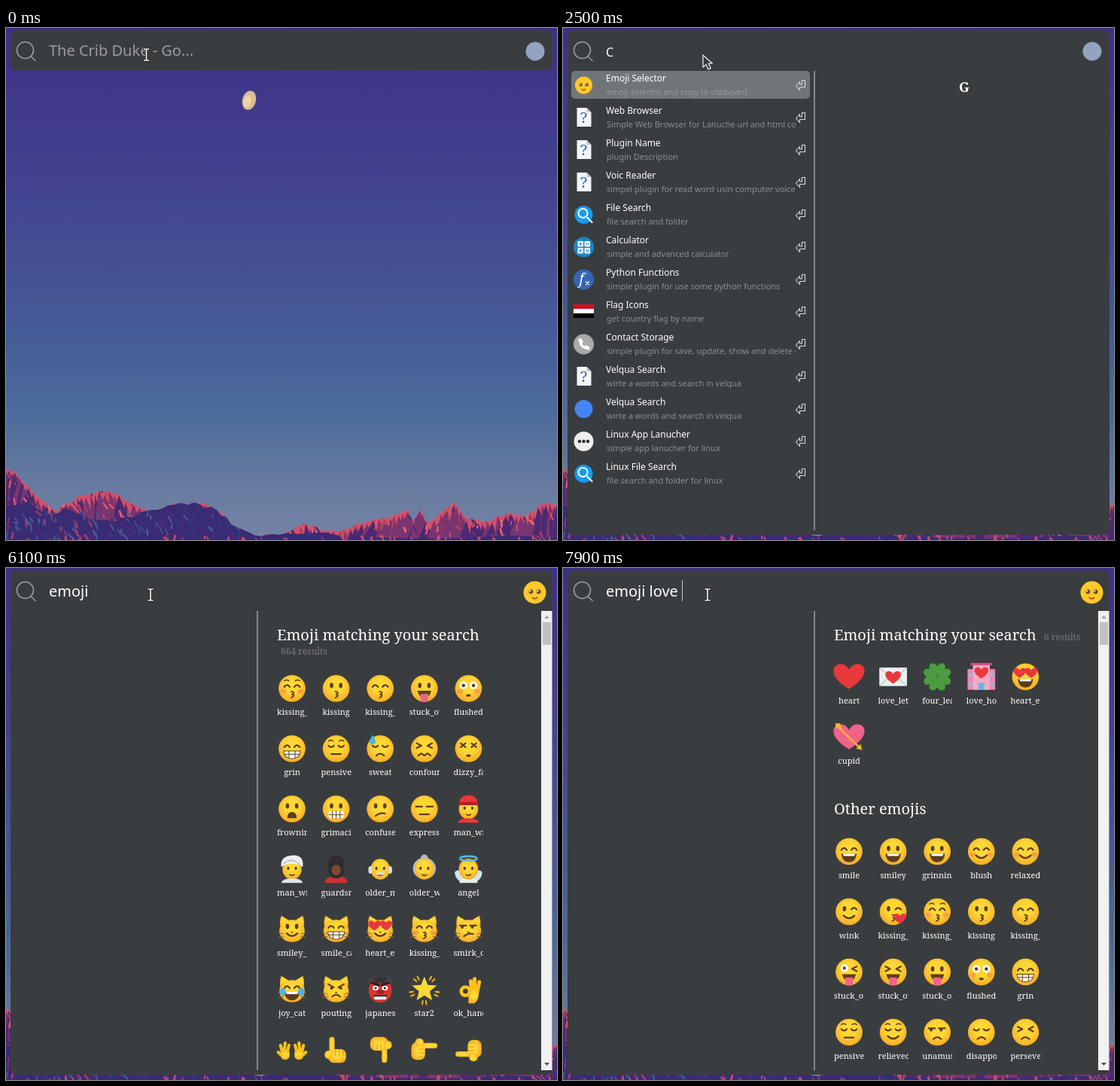
Write an HTML page that moves like this. It is 732 by 680 pixels and loops after 8 s.

```html
<!DOCTYPE html>
<html lang="en">
<head>
<meta charset="utf-8">
<title>Launcher</title>
<style>
html, body { margin: 0; width: 732px; height: 680px; overflow: hidden; background: #3f3289 }
svg { display: block }
text { font-family: "Noto Sans", sans-serif; white-space: pre }
.serif, .label { font-family: "Noto Serif", serif }
.mid { text-anchor: middle }
.bold { font-weight: 700 }
.label { font-size: 11px; line-height: 16px; width: 40px; overflow: hidden; text-align: center; white-space: nowrap; color: #fff }
</style>
</head>
<body>
<script>
const B = '#5f3d1c', Y = 'url(#skin)', RED = '#e8383d', PINK = '#f0628c';

// Drawing helpers; small pictures are centred on 0,0 and about 36 wide.
const L = (d, c = B, w = 2.2) => `<path d="M${d}" fill="none" stroke="${c}" stroke-width="${w}" stroke-linecap="round" stroke-linejoin="round"/>`;
const F = (d, c) => `<path d="M${d}z" fill="${c}"/>`;
const O = (x, y, r, c, q = r) => `<ellipse cx="${x}" cy="${y}" rx="${r}" ry="${q}" fill="${c}"/>`;
const R = (x, y, w, h, c, r = 0) => `<rect x="${x}" y="${y}" width="${w}" height="${h}" rx="${r}" fill="${c}"/>`;
const T = (x, y, size, s, c = '#fff', cls = '') => `<text x="${x}" y="${y}" font-size="${size}" fill="${c}" class="${cls}">${s}</text>`;
const at = (x, y, k, s, a = 0) => `<g transform="translate(${x} ${y}) rotate(${a}) scale(${k})">${s}</g>`;
const two = s => s + `<g transform="scale(-1 1)">${s}</g>`;
const many = (n, f) => Array.from({ length: n }, (_, i) => f(i)).join('');
const turn = (n, s) => many(n, i => at(0, 0, 1, s, i * 360 / n));
const group = (id, s) => `<g id="${id}">${s}</g>`;
const heart = c => F('0 16C-40-8-10-28 0-9 10-28 40-8 0 16', c);
const star = (n, a, b, c) => F(Array.from({ length: 2 * n }, (_, i) => {
  const r = i % 2 ? a : b, q = i * Math.PI / n;
  return (r * Math.sin(q)).toFixed(1) + ' ' + (-r * Math.cos(q)).toFixed(1);
}).join('L'), c);
const person = (x, hair, shirt, y = 0) => at(x, y, 1,
  R(-6, -5, 12, 15, shirt, 4) + R(-4, 8, 8, 10, '#37474f') + O(0, -12, 5.5, hair) + O(0, -10, 4, Y));
const point = a => at(0, 0, 1, R(-9, -17, 7, 26, Y, 3.5) + R(-10, -1, 23, 18, Y, 7) + R(-15, 1, 10, 11, Y, 5) +
  L('-1 0v7m5-7v7m5-6v6', '#e09a20', 1), a);
const phone = c => L('-9-10Q-10 8 10 10', c, 6) + L('-9-11l2 5M6 8l5 2', c, 10);

const part = {
  face: O(0, 0, 17.5, Y),
  cat: two(F('3-11l11-7q3 8 1 16', Y)) + O(0, 2, 16.5, Y, 14.5) + two(L('11 6l7-2m-7 5l7 1', '#8a6a3a', 1)) + F('-2 3h4l-2 2', B),
  imp: two(F('5-11q8-1 9-7 4 7 0 13', '#8e3fa8')) + O(0, 1, 16, '#9c4fc0'),
  man: O(0, 0, 12.5, Y, 13.5) + two(O(5, -1, 1.6, B, 2.1)) + L('-3 7q3 2.5 6 0', B, 1.5),
  // eyes
  dot: two(O(6, -4, 2.3, B, 3.4)), arc: two(L('3-2q3.5-5 7 0')), shut: two(L('3-4q3.5 4 7 0')),
  flat: two(L('3-3h8')), cross: two(L('4-7l6 5m0-5l-6 5')), squint: two(L('10-7l-6 3 6 3')),
  big: two(O(6.5, -4, 5, '#fff') + O(6.5, -4, 2.2, B)), love: two(at(7.5, -5, .4, heart(RED))),
  wink: O(-6, -4, 2.3, B, 3.4) + L('3-3q3.5-4 7 0'), goofy: O(-6, -5, 5, '#fff') + O(-6, -5, 2, B) + L('10-7l-6 3 6 3'),
  side: L('-11-5h8m5 0h8') + O(-8, -3, 2, B) + O(5, -3, 2, B),
  shades: two(F('1-7h15q0 10-7 10t-8-10', '#292b2e')) + L('-15-7h30', '#292b2e'),
  angry: two(L('3-3l7-4')) + two(O(6, -2, 2, B)),
  // mouths
  kiss: L('-1 4q6 1 1 4 5 1-1 4', B, 1.8), smile: L('-7 5q7 7 14 0'), frown: L('-5 9q5-5 10 0'),
  wave: L('-8 9l4-3 4 3 4-3 4 3'), gape: F('-6 12q0-8 6-8t6 8', B), line: L('-6 7h12'), skew: L('-6 9q6-5 12-3'), small: O(0, 9, 3, B, 1.6),
  open: F('-10 3h20q-1 11-10 11t-10-11', B) + F('-8 3h16l-1 3h-14', '#fff'),
  teeth: F('-11 3h22q-1 10-11 10t-11-10', '#fff') + L('-11 3h22q-1 10-11 10t-11-10zm1 4h20M-4 3v9M4 3v9', B, 1),
  clench: R(-10, 3, 20, 9, '#fff', 3) + L('-9 7.5h18M-5 3v9M0 3v9M5 3v9', B, 1),
  tongue: F('-9 3h18q-2 9-9 9t-9-9', B) + F('-5 7h10v6q0 5-5 5t-5-5', PINK),
  // extras
  blush: two(O(11, 4, 4, '#f58b4c99', 3)), brow: two(L('4-10q3-2 6 0', B, 1.4)),
  kissheart: at(9, 9, .4, heart(RED)), drop: F('-10-18q-5 8-4 10 4 5 8 0 1-2-4-10', '#4fb3e8'),
  tears: two(O(12, 3, 4, '#4fb3e8', 5)),
  guapi: F('-12-7q1-11 12-11t12 11', RED) + R(-13, -9, 26, 4, '#b71c1c', 2) + F('-14 18q2-6 14-6t14 6', RED),
  turban: F('-14-3q-2-14 14-15t14 15q-14-8-28 0', '#eceff1') + L('-11-7Q0-17 11-5', '#b0bec5', 1.3) + F('-14 18q1-6 14-6t14 6', '#e3e6e8'),
  guard: F('-15 18q1-9 15-9t15 9', '#d32f2f') + R(-10, -18, 20, 30, '#302c2d', 9) + O(0, 1, 6, '#7a4a35', 7),
  oldman: two(O(13, 1, 2.5, '#ddd', 5)) + F('-7 6q7-4 14 0-7 3-14 0', '#ddd'),
  oldhair: O(0, -14, 5, '#b6b8ba') + O(0, -1, 15, '#b6b8ba', 14),
  halo: two(F('5 6q9-8 13-2-1 10-9 13', '#cfe5ee')) + F('-12 18q1-8 12-8t12 8', '#e6eef2') + O(0, -4, 13, '#6d4330'),
  ring: `<ellipse cy="-14" rx="11" ry="3" fill="none" stroke="#55b9e8" stroke-width="2.5"/>`,
  ogre: two(F('5-11q7-2 7-7 6 7 1 12', '#444')) + O(0, 1, 15, '#d73530', 16) + O(0, -12, 9, '#3a3233', 4) + two(O(6, -2, 4, '#fff', 3) + O(6, -2, 1.5, '#222') + L('2-6l9-3', '#222', 3)) +
    O(0, 3, 5, '#a81f24', 3) + R(-8, 8, 16, 5, '#eee', 2) + L('-8 8h16', '#3a3233'),
  star2: turn(5, at(0, -13, 1, L('-7 0l-2-4M7 0l2-4', '#fcb316', 2))) + star(5, 7.5, 17, '#fdd835'),
  ok_hand: L('4 2L3-11M8 2V-14M11 5l3-15', '#fcc21b', 5) + F('0 0h13q2 12-5 18h-8', Y) + `<circle cx="-4" cy="2" r="5.5" fill="none" stroke="#fcc21b" stroke-width="4.5"/>`,
  open_hands: two(R(3, -1, 12, 14, Y, 6) + L('6 2L4-6M10 1l-1-10M13 2l2-8M15 6l3-3', '#fcc21b', 4)),
  point_up_2: point(0), point_down: point(180), point_right: point(90), point_left: point(-90),
  hair: O(0, -2, 15, '#593c2b', 15) + two(R(8, 0, 9, 16, '#593c2b', 4)),
  fringe: F('-12-2q1-12 12-12t12 12q-14 0-18-6-1 5-6 6', '#593c2b'),
  see_no_evil: two(O(15, 2, 4, '#c49a78')) + O(0, 0, 15, '#795645', 16) + O(0, 6, 11, '#d6ad89', 9) + two(O(6, -3, 7, '#927059', 6) + L('4-6v5m4-5v5', '#694b3b', 1)) + L('-4 10q4 3 8 0', B, 1.5),
  boom: star(12, 8, 18, '#e8432e') + star(12, 6, 13, '#fb9b26') + star(10, 4, 8, '#ffe46b'),
  clap: at(0, 2, 1, R(-8, -8, 17, 24, Y, 7) + L('-5-5v-7M0-6v-8M5-5v-7M9 4l4-7', '#fcc21b', 4.5) + L('-3-4v7M2-4v7', '#e39a20', 1), -25) + L('5-13l1-4m4 6l4-3m-2 7l4 0', '#b9d7e6', 1.6),
  muscle: F('-17 14q-2-22 5-30l8-1q4 4 1 7l-6 3q-1 6 2 8 8-8 18-3 10 8 4 16-14 8-32 0', Y),
  family: person(-9, '#4c3426', '#3f9b4a') + person(9, '#5b3b2a', '#8e44ad') + at(-6, 8, .7, person(0, '#4c3426', '#f0b429')) + at(7, 8, .7, person(0, '#593c2b', '#29a3d6')),
  two_men_holding_hands: person(-9, '#3a2a22', '#2878b5') + person(9, '#3a2a22', '#4a9b45') + L('-4 2L0 7l4-5', '#fcc21b'),
  two_women_holding_hands: person(-9, '#5b3b2a', '#8b4bb0') + person(9, '#5b3b2a', '#c2559f') + L('-4 2L0 7l4-5', '#fcc21b'),
  eyeglasses: two(R(2, -5, 15, 10, '#cfd8dc', 4) + R(4, -3, 11, 6, '#5f6b72', 3)) + L('-3-3h6', '#cfd8dc'),
  love_letter: R(-18, -12, 36, 24, '#eceff1', 1) + L('-17 11L-4 0M17 11L4 0M-17-11L0 3l17-14', '#b0bec5', 1) + at(0, 1, .5, heart(RED)),
  turtle: two(O(9, 11, 4, '#5e9c3a')) + O(12, -2, 6, '#74b04a') + O(14, -4, 1.3, '#222') + F('-18 10q2-20 15-20t14 20', '#4b7b33') + L('-13 4l7-8 8 0 5 8m-13-8l-1 9', '#9dc46a', 1.5),
  snail: F('-12 15q-3-4 4-5h10l7-15 6 0q5 2 2 6l-8 13', '#c99a72') + O(-3, 0, 12, '#8a5a3b') + L('-3 1q4-2 3 3-6 4-8-3 0-8 8-8 8 3 8 8', '#c99a72') + L('11-5l-1-6m5 6l2-6', '#c99a72', 1.5),
  cherry_blossom: turn(5, O(0, -11, 7, '#f8c8dc', 7.5)) + turn(5, L('0-4v-6', '#d8578f', 1.4)) + O(0, 0, 4, '#e57ba4'),
  tulip: L('0-2v19', '#4f9d3a', 2.6) + F('0 16q-10-4-10-14 9 4 10 14 1-10 10-14 0 10-10 14', '#4f9d3a') + F('-8-14l4 3 4-7 4 7 4-3q3 17-8 17t-8-17', '#e4447a'),
  four_leaf_clover: L('0 0q4 8 9 16', '#3f8a38') + turn(4, at(0, -9, .52, heart('#4c9b41'))),
  leaves: L('-2-4Q2-16 16-15M14-8Q18-2 12 6', '#8b9c90', 1.6) + F('-16-2Q-2-8 11 0 18 8 11 13-8 18-16-2', '#3f9149') + L('-12 0Q2 2 11 9', '#7dbd6b', 1.2),
  seedling: L('0 16Q1 6 0 2', '#5c9e3b', 3) + F('0 3Q-16 4-17-9-2-10 0 3', '#67ad45') + F('0 2Q0-14 17-15 17 0 0 2', '#67ad45') + O(0, 16, 10, '#6b4a34', 2),
  globe_with_meridians: O(0, 0, 17.5, '#2b8fd3') + L('-17 0h34M0-17v34M-14-9h28M-14 9h28M0-17q-18 17 0 34 18-17 0-34', '#8fc9ef', 1.3),
  partly_sunny: at(3, -5, 1, turn(10, L('0-9v-3', '#fbb124'))) + O(3, -5, 8, '#fdbf2d') + O(-8, 7, 8, '#e8eef2') + O(2, 4, 9, '#f3f6f8') + O(10, 9, 7, '#e8eef2') + R(-8, 7, 18, 9, '#e8eef2', 3),
  snowflake: turn(6, L('0 0v-16m-4 1l4 4 4-4m-8 7l4 4 4-4', '#a6dcf5', 2)),
  cyclone: turn(3, F('-3-9q6-9 19-6-8 1-8 9-1 9-7 10 4-8-4-13', '#1e86cf')) + O(0, 0, 12, '#1e86cf') + O(0, 0, 5, '#3a3d40'),
  jack_o_lantern: R(-3, -17, 6, 8, '#5a7d2e', 2) + O(0, 2, 17, '#e87a1c', 14) + L('-6-10q-6 12 0 24M6-10q6 12 0 24', '#c25d10', 1) + two(F('3 0l4-7 4 7', '#31261c')) + F('-11 4l6 3 5-2 5 2 6-3q-3 9-11 9t-11-9', '#31261c'),
  telephone_receiver: phone('#52575c'),
  satellite: F('-11-9Q-12 12 10 10', '#8a93c4') + F('-11-9Q8-8 10 10-8 8-11-9', '#b0b8dc') + L('0 0L13-14M-4 10l-4 7h14l-4-7', '#8a93c4', 2),
  no_bell: F('-11 9q4-3 4-11t7-9 7 9 4 11', '#f7b526') + O(0, 11, 4, '#d48a16', 3) + `<circle r="15.5" fill="none" stroke="#d92b2f" stroke-width="3.6"/>` + L('-11-11l22 22', '#d92b2f', 3.6),
  bulb: O(0, -6, 11, '#fdd85d') + F('-7 0h14l-2 9h-10', '#fdd85d') + R(-5, 8, 10, 8, '#9aa7ad', 3) + L('-3 7v-9l3 3 3-3v9', '#e0a02b', 1.2),
  pill: at(0, 0, 1, R(-18, -8, 36, 16, '#f9c430', 8) + F('0-8h-10q-8 0-8 8t8 8h10', '#e43c34') + L('-11-4h20', '#ffffff77', 2), 40),
  calling: R(0, -17, 17, 35, '#414a50', 3) + R(2, -13, 13, 26, '#7b98a6') + F('-18-3h8v-5l9 8-9 8v-5h-8', '#fba322'),
  email: R(-18, -12, 36, 25, '#fbc02d', 2) + L('-17 12L-5 0M17 12L5 0M-17-11L0 3l17-14', '#e08f1b', 1.2),
  date: R(-17, -17, 34, 34, '#f2f2f2', 2) + R(-17, -17, 34, 14, '#2b8fd3', 2) + T(0, -7, 9, 'July', '#fff', 'mid bold') + T(0, 13, 17, '17', '#333', 'mid bold'),
  clapper: R(-17, -4, 34, 21, '#37474f', 1) + at(-16, -5, 1, R(0, -8, 34, 7, '#37474f') + F('4-8h5l4 7h-5M15-8h5l4 7h-5M26-8h5l4 7h-5', '#eee'), -10) + R(-17, -4, 34, 6, '#eee') + L('-13-3l4 4M-2-3l4 4m7-4l4 4', '#37474f', 3) + L('-13 8h26m-26 5h26', '#90a4ae', 1),
  heart: heart(RED),
  love_hotel: R(-18, -10, 36, 27, '#ef86ae', 1) + R(-11, -17, 22, 34, '#f5a9c4', 1) + R(-14, -18, 28, 3, '#d64e84') + at(0, -5, .45, heart(RED)) + R(-4, 8, 8, 9, '#66b7df') + two(R(12, 7, 4, 5, '#7cc7e8') + R(12, -5, 4, 5, '#7cc7e8')),
  cupid: heart(PINK) + L('-14-13L14 14', '#f6b42b', 2.4) + F('-18-18h6l3 8-8-2M17 17l-8-2 6-6', '#f6b42b')
};

const look = {
  kissing_closed_eyes: 'face blush arc brow kiss', kissing: 'face dot kiss', kissing_smiling_eyes: 'face arc kiss',
  stuck_out_tongue: 'face dot tongue', flushed: 'face blush big small', grin: 'face arc teeth', pensive: 'face shut brow line',
  sweat: 'face shut frown drop', confounded: 'face squint wave', dizzy_face: 'face cross small', frowning: 'face dot gape',
  grimacing: 'face dot clench', confused: 'face dot skew', expressionless: 'face flat line', man_with_gua_pi_mao: 'man guapi',
  man_with_turban: 'man turban', guardsman: 'guard', older_man: 'man oldman', older_woman: 'oldhair man', angel: 'halo man ring',
  smiley_cat: 'cat dot smile', smile_cat: 'cat arc teeth', heart_eyes_cat: 'cat love smile', kissing_cat: 'cat blush arc kiss',
  smirk_cat: 'cat side skew', joy_cat: 'cat arc open tears', pouting_cat: 'cat angry frown', japanese_ogre: 'ogre',
  smile: 'face arc open', relaxed: 'face blush arc smile', sunglasses: 'face shades smile', smiling_imp: 'imp angry smile',
  girl: 'hair man fringe', heart_eyes: 'face open love', smiley: 'face dot open', grinning: 'face dot open', blush: 'face blush arc smile',
  wink: 'face wink smile', kissing_heart: 'face wink kiss kissheart', stuck_out_tongue_winking_eye: 'face goofy tongue',
  stuck_out_tongue_closed_eyes: 'face squint tongue', relieved: 'face shut brow smile', unamused: 'face side frown',
  disappointed: 'face shut frown', persevere: 'face squint frown'
};
const draw = name => (look[name] || name).split(' ').map(p => part[p]).join('');

const grid = (y0, names) => names.trim().split(/\s+/).map((name, i) => {
  const x = 380 + i % 5 * 58.6, y = y0 + Math.floor(i / 5) * 80;
  return at(x, y, 1.02, draw(name)) +
    `<foreignObject x="${x - 20}" y="${y + 23}" width="40" height="16"><div class="label">${name}</div></foreignObject>`;
}).join('');
const title = (y, s) => T(360, y, 20, s, '#fff', 'serif');
const count = (x, y, n) => T(x, y, 12, n + ' results', '#77797a', 'serif');

const smiley = r => at(0, 0, r / 63, O(0, 0, 63, '#ffc927') +
  two(O(21.5, -4, 12.5, '#6d4c41')) + O(-27, -8, 4.8, '#fff') + O(16, -8, 4.8, '#fff') + L('-13 29q13 13 26 0', '#8d4a1f', 7));
const glass = L('5 4l6 6', '#fff', 2.2) + `<circle cx="-1" cy="-2" r="6" fill="none" stroke="#fff" stroke-width="2"/>`;
const icons = {
  smiley: smiley(11.5),
  doc: F('-9-13h13l6 6v19h-19', '#f4f5f6') + F('4-13l6 6h-6', '#c4c8cb') + T(0, 7, 20, '?', '#2c64b0', 'serif mid'),
  find: O(0, 0, 12, '#159bf3') + glass,
  calc: O(0, 0, 13.5, '#1a87c4') + [[-8, -8], [1, -8], [-8, 1], [1, 1]].map(p => R(...p, 7.5, 7.5, '#fff', 1)).join('') +
    L('-6.5-4.2h4.5m-2.2-2.2v4.5M3-4.2h4M-6 3l3 4m0-4l-3 4M3 4h4m-4 2h4', '#1a87c4', 1),
  func: O(0, 0, 13.5, '#3566b4') + `<g font-style="italic">${T(-3, 6, 19, 'f', '#fff', 'serif mid')}</g>` + L('3 3l4 4m0-4l-4 4', '#fff', 1.2),
  flag: R(-13.5, -10, 27, 6, '#ce1126') + R(-13.5, -4, 27, 6, '#fff') + R(-13.5, 2, 27, 6, '#000'),
  call: O(0, 0, 13.5, '#a9a9ab') + at(0, 0, .5, phone('#fff')),
  disc: O(0, 0, 12, '#4285f4'),
  dots: O(0, 0, 13, '#efefef') + [-5.5, 0, 5.5].map(x => O(x, 0, 2.3, '#333')).join('')
};
const rows = [
  ['smiley', 'Emoji Selector', 'emoji selectro and copy to clipboard'],
  ['doc', 'Web Browser', 'Simple Web Browser for Lanuche url and html code'],
  ['doc', 'Plugin Name', 'plugin Description'],
  ['doc', 'Voic Reader', 'simpel plugin for read word usin computer voice'],
  ['find', 'File Search', 'file search and folder'],
  ['calc', 'Calculator', 'simple and advanced calculator'],
  ['func', 'Python Functions', 'simple plugin for use some python functions'],
  ['flag', 'Flag Icons', 'get country flag by name'],
  ['call', 'Contact Storage', 'simple plugin for save, update, show and delete contacts'],
  ['doc', 'Velqua Search', 'wirte a words and search in velqua'],
  ['disc', 'Velqua Search', 'wirte a words and search in velqua'],
  ['dots', 'Linux App Lanucher', 'simple app lanucher for linux'],
  ['find', 'Linux File Search', 'file search and folder for linux']
];
const list = R(11, 57, 317, 37, '#707677', 5) + rows.map(([icon, name, info], i) => at(0, 43 * i, 1,
  at(27.5, 76, 1, icons[icon]) + T(57, 71, 12, name) +
  `<svg x="58" y="76" width="251" height="18">${T(0, 13, 11, info, i ? '#8b8f90' : '#94999a')}</svg>` +
  L('317.5 69.5h4v9h-7v4l-5-5.5 5-5.5v3.5h3z', '#d8d9da', 1.1))).join('');

// Wallpaper: sky, moon and rough mountains with shaded facets
let seed = 7;
const rnd = () => (seed = seed * 16807 % 2147483647) / 2147483647;
const rough = s => {
  const pts = s.split(' ').map(p => p.split(',').map(Number));
  return pts.flatMap(([x, y], i) => {
    const [u, v] = pts[i + 1] || [x, y];
    return [0, .25, .5, .75].map(k => [x + (u - x) * k, y + (v - y) * k + (k && rnd() * 6 - 3)].map(Math.round));
  });
};
const close = pts => pts.join('L') + 'V680H0';
const ridge = rough('0,587 12,590 24,604 48,627 66,641 80,632 100,622 124,614 150,620 187,641 215,634 250,630 280,640 305,662 340,675 368,672 398,658 420,668 450,666 480,656 510,650 533,640 540,654 550,640 560,657 595,630 612,652 640,655 665,645 690,650 712,632 732,634');
const base = rough('0,634 30,628 60,650 80,641 110,652 150,654 187,641 215,634 250,630 280,640 305,662 340,674 400,671 500,677 732,677');
const facets = ridge.map(([x, y]) => F(`${x} ${y + 3 * rnd()}l${4 + 7 * rnd()} 20 ${6 * rnd() - 8} 40h-9l${8 * rnd() - 4}-38`, rnd() < .5 ? '#4b2a72' : '#7a3570')).join('');
const specks = (n, x0, y0, w, h, colors) => many(n, () =>
  L(`${x0 + w * rnd()} ${y0 + h * rnd()}l${8 * rnd() - 2} ${3 + 6 * rnd()}`, colors[Math.floor(rnd() * colors.length)], 1 + 2 * rnd()));
const wall = R(0, 0, 732, 680, 'url(#sky)') +
  at(323, 96, 1, O(0, 0, 9, '#d9bd94', 13) + O(-2, 2, 5, '#eed5a6', 8), 14) +
  `<g clip-path="url(#range)">${R(0, 580, 732, 100, '#d64f66') + facets}` +
  specks(420, 0, 590, 732, 90, ['#e2566a', '#b3415f', '#4b2a72', '#e86a70']) + F(close(base), '#3a2b75') +
  specks(90, 20, 640, 290, 40, ['#34397c', '#4a2c72', '#4a5890']) +
  specks(40, 0, 640, 120, 40, ['#a83c62', '#4a5890']) + specks(45, 60, 674, 672, 4, ['#c84a64']) + '</g>';

const preview = at(533, 224, 1, smiley(63)) + T(533, 357, 24, 'Emoji Selector', '#fff', 'serif mid bold') +
  T(533, 405, 13, 'emoji selectro and copy to clipboard', '#bcbdbe', 'serif mid') + R(402, 487.5, 262, 1.5, '#838688') +
  T(533, 507, 13, 'Keyword: emoji', '#bcbdbe', 'serif mid') + T(533, 534, 13, 'Version: 1.0.0', '#bcbdbe', 'serif mid');
const scroll = R(711, 57, 14.5, 610, '#f1f1f1') + R(713, 72, 11, 30, '#c1c1c1') + F('715 67h7l-3.5-4', '#a3a3a3') + F('715 657h7l-3.5 4', '#505050');
const match = 'Emoji matching your search';
const all = title(96, match) + count(365, 115, 864) + grid(160, `kissing_closed_eyes kissing kissing_smiling_eyes stuck_out_tongue flushed
  grin pensive sweat confounded dizzy_face frowning grimacing confused expressionless man_with_gua_pi_mao
  man_with_turban guardsman older_man older_woman angel smiley_cat smile_cat heart_eyes_cat kissing_cat smirk_cat
  joy_cat pouting_cat japanese_ogre star2 ok_hand open_hands point_up_2 point_down point_right point_left`);
const some = title(96, match) + count(365, 115, 509) + grid(160, `smile relaxed sunglasses smiling_imp girl see_no_evil boom clap muscle family
  two_men_holding_hands two_women_holding_hands eyeglasses love_letter turtle snail cherry_blossom tulip four_leaf_clover leaves
  seedling globe_with_meridians partly_sunny snowflake cyclone jack_o_lantern telephone_receiver satellite no_bell bulb
  pill calling email date clapper`);
const few = title(96, match) + count(639, 96, 6) + grid(144.5, 'heart love_letter four_leaf_clover love_hotel heart_eyes cupid') +
  title(327, 'Other emojis') + grid(376.5, `smile smiley grinning blush relaxed wink kissing_heart kissing_closed_eyes kissing kissing_smiling_eyes
  stuck_out_tongue_winking_eye stuck_out_tongue_closed_eyes stuck_out_tongue flushed grin pensive relieved unamused disappointed persevere`);

const beam = '-3-7.5h2l1 1 1-1h2M0-6.5V6.5M-3 7.5h2l1-1 1 1h2';
document.body.innerHTML = `<svg width="732" height="680"><defs>
  <linearGradient id="sky" x2="0" y2="1"><stop stop-color="#3e3088"/><stop offset=".3" stop-color="#43428f"/>
    <stop offset=".6" stop-color="#465c97"/><stop offset=".75" stop-color="#4c6b9b"/><stop offset=".88" stop-color="#65799f"/><stop offset="1" stop-color="#7484a6"/></linearGradient>
  <radialGradient id="skin" cy=".4" r=".62"><stop offset=".4" stop-color="#fdd835"/><stop offset="1" stop-color="#f7a928"/></radialGradient>
  <clipPath id="range"><path d="M${close(ridge)}"/></clipPath></defs>` +
  wall + `<rect id="box" x="6" y="3" width="720" rx="8" fill="#3a3d3f"/>` +
  `<circle cx="25.5" cy="29.5" r="11" fill="none" stroke="#999b9d" stroke-width="1.6"/>` + L('33.5 38l5.5 5.5', '#999b9d', 1.6) +
  group('hint', T(57, 37, 20, 'The Crib Duke - Go...', '#9a9c9d')) + `<text id="typed" x="57" y="38" fill="#fff"></text>` +
  `<rect id="caret" width="1" height="28" fill="#c4c6c7"/>` +
  group('badge', O(703, 31, 12.5, '#93a3c0')) + group('mark', at(702.5, 32.5, 1, smiley(15))) +
  group('split', R(333, 57, 2, 610, '#85888a')) + group('list', list) +
  group('letter', T(533, 85, 18, 'G', '#fff', 'serif mid bold')) + group('preview', preview) +
  `<svg y="57" width="732" height="610" viewBox="0 57 732 610">` +
  group('all', all) + group('some', some) + group('few', few) + group('scroll', scroll) + '</svg>' +
  group('beam', L(beam, '#222', 3.4) + L(beam, '#fff', 1.6)) +
  group('arrow', `<path d="M0 0V16l4-3.4 3 6.4 3.2-1.5-3-6.2 5-.5z" fill="#3a3a3a" stroke="#fff" stroke-width="1.1"/>`) + '</svg>';

const $ = id => document.getElementById(id);
const set = (id, o) => Object.entries(o).forEach(([k, v]) => $(id).setAttribute(k, v));
const show = (id, on) => { $(id).style.display = on ? '' : 'none'; };
const pick = (steps, t) => steps.filter(s => s[0] <= t).pop()[1];

const words = [[0, ''], [2200, 'C'], [5400, 'emoji '], [6800, 'emoji l'], [7000, 'emoji lo'], [7200, 'emoji lov'], [7300, 'emoji love']];
const carets = [[0, 0], [600, 57], [1100, 0], [1600, 57], [2200, 67], [2500, 0], [5400, 115], [5900, 0],
  [6800, 120], [7000, 132], [7200, 142], [7300, 153], [7800, 0], [7900, 158]];

function pointer(t) {
  if (t < 2100) return [186.5, 35.5, true];
  if (t < 4700) return [186, 36, false];
  if (t < 5400) return [140, 72, false];
  const u = Math.min(1, (Math.floor((t - 5400) / 100) + 1) / 8);
  return [140 + 52 * u, 72 - 36.5 * u, u > .45];
}

function render(t) {
  const open = t >= 2100, results = t >= 5400;
  set('box', { height: open ? 670 : 53 });
  show('hint', t < 2200);
  $('typed').textContent = pick(words, t);
  set('typed', results ? { 'font-size': 20, 'font-weight': 400 } : { 'font-size': 16, 'font-weight': 500 });
  const c = pick(carets, t);
  show('caret', c);
  set('caret', { x: c, y: open ? 16 : 15 });
  show('badge', t < 4700);
  show('mark', t >= 4700);
  show('split', open);
  show('list', open && !results);
  show('letter', open && t < 4700);
  show('preview', t >= 4700 && !results);
  show('scroll', results);
  show('all', results && t < 6800);
  show('some', t >= 6800 && t < 7400);
  show('few', t >= 7400);
  const [x, y, text] = pointer(t);
  show('beam', text);
  show('arrow', !text);
  set(text ? 'beam' : 'arrow', { transform: `translate(${x} ${y})` });
}

const start = performance.now();
function tick() {
  render((performance.now() - start) % 8000);
  requestAnimationFrame(tick);
}
tick();
</script>
</body>
</html>
```
